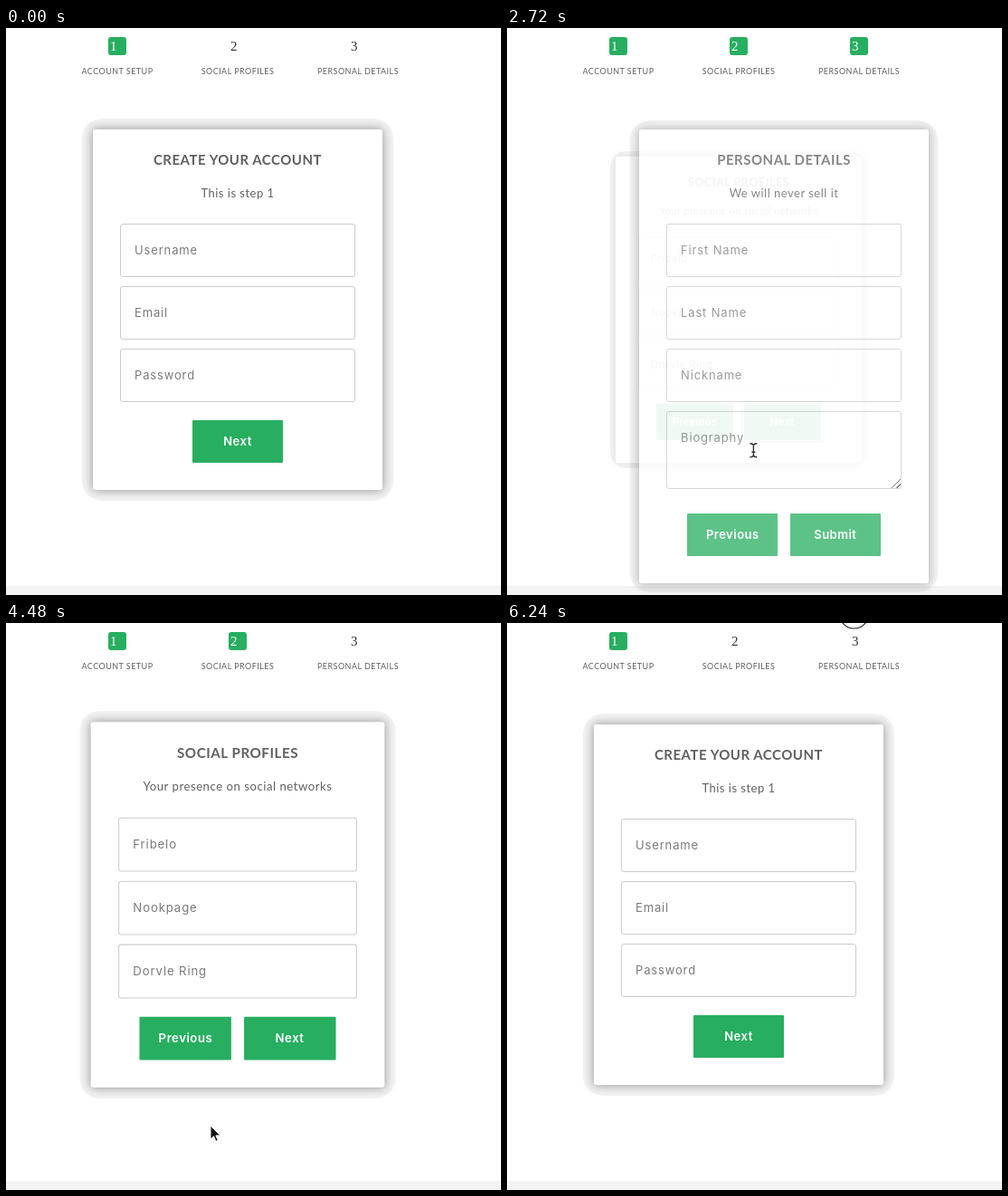
An HTML page for the animation above (6.4 s loop, 547 px wide and 626 px high).

```html
<!DOCTYPE html>
<html lang="en">
<head>
<meta charset="utf-8">
<title>Multi-step form</title>
<style>
html, body { margin: 0; width: 100%; height: 100%; overflow: hidden; background: #fff; }
body { position: relative; font-family: Lato, sans-serif; letter-spacing: .5px; color: #606060; }
.bar { position: absolute; left: 0; right: 0; top: 616px; height: 10px; background: #f3f3f3; }
.step { position: absolute; top: 10px; width: 18px; height: 20px; padding-left: 2px; border-radius: 3px;
  font: 15px/20px "Liberation Serif", serif; letter-spacing: 0; color: #333; }
.step.on { background: #27ae60; color: #fff; }
.label { position: absolute; top: 42px; width: 140px; text-align: center; font-size: 9px; line-height: 12px;
  letter-spacing: .45px; }
.card { position: absolute; left: 96px; top: 112px; width: 320px; height: 398px; isolation: isolate; }
.card.tall { height: 501px; }
.card::before { content: ""; position: absolute; z-index: -1; inset: calc(var(--halo) * -1px);
  border-radius: 22px; background: rgba(0, 0, 0, var(--shade)); }
.card::after { content: ""; position: absolute; z-index: -1; inset: 0; border-radius: 3px; background: #fff;
  box-shadow: 0 0 11px 1px rgba(0, 0, 0, .36); }
h2, h3 { position: absolute; left: 0; right: 0; margin: 0; text-align: center; line-height: 20px; white-space: nowrap; }
h2 { top: 23px; font-size: 15px; font-weight: 700; }
h3 { top: 60px; font-size: 13px; font-weight: 400; }
.field { position: absolute; left: 30px; width: 243px; height: 57px; padding-left: 15px; border: 1px solid #ccc;
  border-radius: 3px; font: 13px/57px Inter, sans-serif; letter-spacing: .85px; color: #7a7a7a; }
.area { height: 84px; }
.area::after { content: ""; position: absolute; right: 0; bottom: 0; width: 10px; height: 10px;
  background: linear-gradient(135deg, transparent 46%, #555 46% 54%, transparent 54% 74%, #555 74% 82%, transparent 82%); }
.row { position: absolute; left: 0; right: 0; bottom: 30px; display: flex; justify-content: center; gap: 13.5px; }
.btn { width: 100px; height: 47px; border-radius: 1px; background: #27ae60; color: #fff; text-align: center;
  font: 600 13px/47px Inter, sans-serif; letter-spacing: .5px; }
.btn.ring { box-shadow: 0 0 0 2px #fff, 0 0 0 3px #27ae60; }
svg { position: absolute; left: 0; top: 0; width: 100%; height: 100%; pointer-events: none; }
</style>
</head>
<body>
<div class="bar"></div>
<svg id="overlay">
  <circle id="dot" cx="383.5" cy="-10" r="16" fill="#fff" stroke="#222" stroke-width="1.2"/>
  <g id="cursor" stroke-linejoin="round">
    <g id="hand" transform="translate(-6.5 -.5)">
      <path fill="#fff" stroke="#222" stroke-width="1.2" d="M5 11V2a1.5 1.5 0 0 1 3 0V7a1.4 1.4 0 0 1 2.7 0a1.4 1.4 0 0 1 2.6.6a1.3 1.3 0 0 1 2.4.9v4q-.3 2-1.7 3.5v2H7v-2Q4.5 14 1.6 10.5a1.4 1.4 0 0 1 2-1.7z"/>
      <path stroke="#222" d="M8.5 11.5v3.5m2-3.5v3.5m2-3.5v3.5"/>
    </g>
    <path id="beam" fill="none" stroke="#333" stroke-width="1.4" d="M-4-7.5q4 0 4 2.5V5q0 2.5-4 2.5M4-7.5q-4 0-4 2.5m0 10q0 2.5 4 2.5M-2 2h4"/>
    <path id="arrow" fill="#111" stroke="#fff" d="M0 0v15l3.5-3.3 2.4 5.6 2.4-1-2.4-5.4h4.9z"/>
  </g>
</svg>
<script>
const LOOP = 6400, TICK = 160;
const $ = id => document.getElementById(id);

function add(parent, cls, text = "", tag = "div") {
  const el = document.createElement(tag);
  el.className = cls;
  el.textContent = text;
  parent.append(el);
  return el;
}

const steps = ["ACCOUNT SETUP", "SOCIAL PROFILES", "PERSONAL DETAILS"].map((name, i) => {
  const x = 113 + 133 * i;
  add(document.body, "label", name).style.left = x - 60 + "px";
  const step = add(document.body, "step", i + 1);
  step.style.left = x + "px";
  return step;
});

const cards = [
  ["CREATE YOUR ACCOUNT", "This is step 1", ["Username", "Email", "Password"], ["Next"]],
  ["SOCIAL PROFILES", "Your presence on social networks", ["Fribelo", "Nookpage", "Dorvle Ring"], ["Previous", "Next"]],
  ["PERSONAL DETAILS", "We will never sell it", ["First Name", "Last Name", "Nickname", "Biography"], ["Previous", "Submit"]]
].map(([title, subtitle, fields, buttons]) => {
  const el = add(document.body, fields.length > 3 ? "card tall" : "card");
  add(el, "", title, "h2");
  add(el, "", subtitle, "h3");
  fields.forEach((name, i) => {
    add(el, i > 2 ? "field area" : "field", name).style.top = 104 + 69 * i + "px";
  });
  const row = add(el, "row");
  return { el, buttons: buttons.map(name => add(row, "btn", name)) };
});
document.body.append($("overlay"));

// start, duration, from card, to card
const moves = [[876, 800, 0, 1], [2292, 775, 1, 2], [3805, 800, 2, 1], [5048, 800, 1, 0]];

// time, x, y of the pointer's hot spot
const path = [
  [160, 395, 102], [640, 247, 513], [800, 247, 513], [960, 256, 459], [1600, 256, 459],
  [1920, 275, 462], [2080, 276, 462], [2240, 276, 462], [3040, 270, 469], [3360, 225, 554],
  [3520, 226, 555], [4480, 226, 555], [4800, 222, 467], [5920, 222, 467]
];

function easeInOutBack(p) {
  const s = 1.70158 * 1.525, t = 2 * p, u = t - 2;
  return t < 1 ? t * t * ((s + 1) * t - s) / 2 : (u * u * ((s + 1) * u + s) + 2) / 2;
}

function placeCards(t) {
  let k = 0, base = 0, level = 0, focus = null;
  for (const [start, dur, from, to] of moves) {
    if (t < start) break;
    const p = Math.min(1, (t - start) / dur);
    k = from + (to - from) * easeInOutBack(p);
    base = Math.min(from, to);
    level = to;
    focus = p < 1 ? cards[from].buttons.at(to > from ? -1 : 0) : null;
  }
  const q = k - base;
  cards.forEach(({ el }, i) => {
    const lower = i === base, upper = i === base + 1;
    const alpha = Math.max(0, Math.min(1, lower ? 1 - q : upper ? q : 0));
    const shown = alpha > 0 || focus && (lower || upper);
    el.style.display = shown ? "block" : "none";
    el.style.opacity = alpha;
    el.style.left = 96 + (upper ? 200 * (1 - q) : 0) + "px";
    el.style.transform = lower && q ? `scale(${1 - 0.2 * q})` : "none";
    el.style.setProperty("--halo", 5 + 7 * alpha);
    el.style.setProperty("--shade", 0.047 / Math.max(alpha, 0.2));
  });
  steps.forEach((step, i) => step.classList.toggle("on", i <= level));
  return focus;
}

function pointerAt(t) {
  const i = path.findIndex(point => point[0] > t);
  if (i < 1) return null;
  const [t0, x0, y0] = path[i - 1], [t1, x1, y1] = path[i];
  const p = (t - t0) / (t1 - t0);
  return [x0 + (x1 - x0) * p, y0 + (y1 - y0) * p];
}

function draw(t) {
  const focus = placeCards(t), pos = pointerAt(t);
  const hit = pos && document.elementFromPoint(...pos);
  const over = cls => !!hit && hit.classList.contains(cls);
  const kind = over("btn") ? "hand" : over("field") ? "beam" : "arrow";

  for (const { buttons } of cards)
    for (const b of buttons) b.classList.toggle("ring", b === focus || b === hit);

  $("cursor").style.display = pos ? "" : "none";
  if (pos) $("cursor").setAttribute("transform", `translate(${pos})`);
  for (const id of ["hand", "beam", "arrow"]) $(id).style.display = id === kind ? "" : "none";
  $("dot").style.display = t >= 6240 ? "" : "none";
}

const begin = performance.now();
function frame() {
  const t = (performance.now() - begin) % LOOP;
  draw(Math.floor(t / TICK) * TICK);
  requestAnimationFrame(frame);
}
frame();
</script>
</body>
</html>
```
